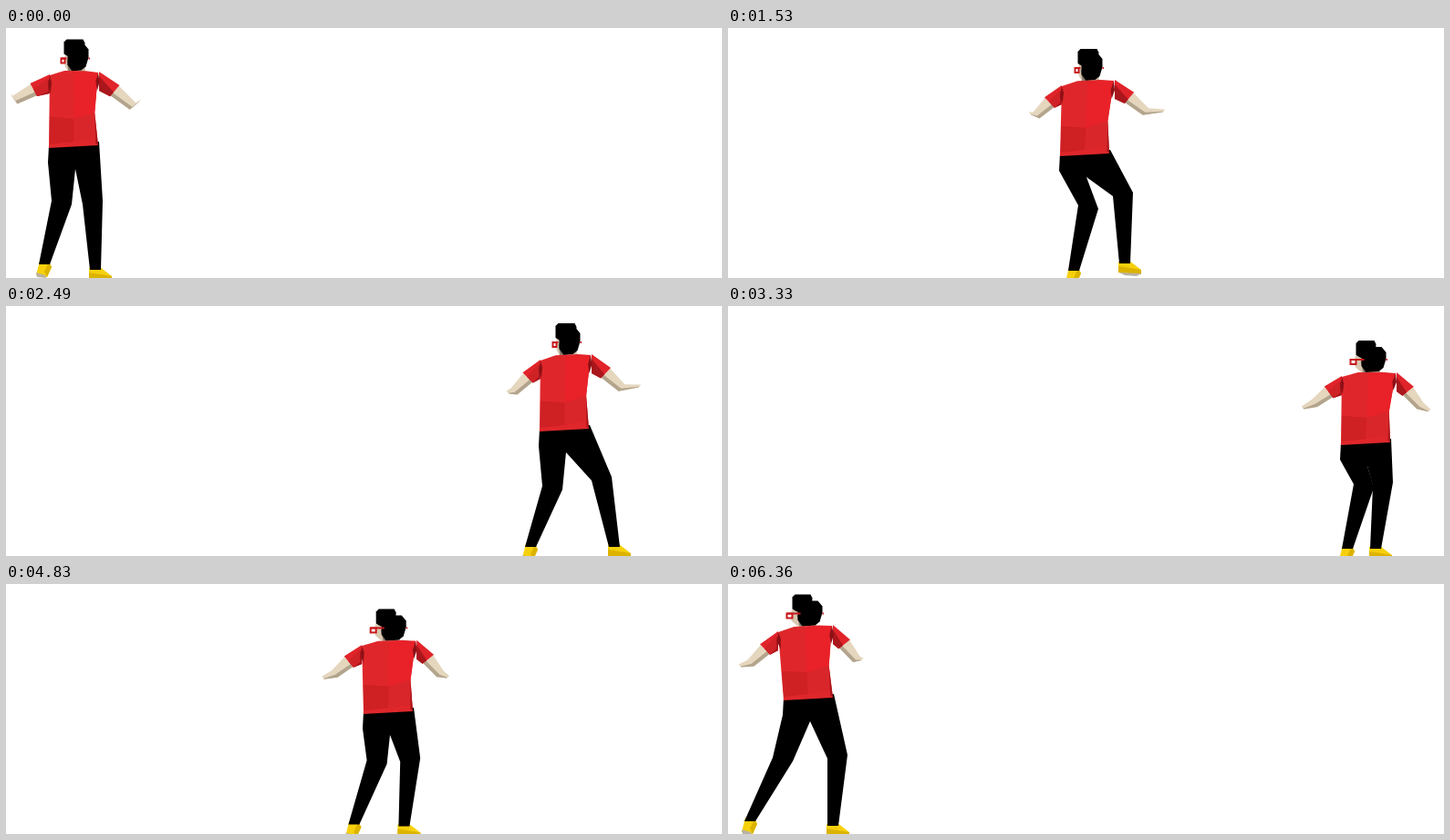
Recreate the animation shown at these times as an HTML page with a canvas. Size 785x275 px, loop 6390 ms.

```html
<!DOCTYPE html>
<html>
<head>
<meta charset="utf-8">
<style>
html, body { margin: 0; width: 100%; height: 100%; overflow: hidden; background: #fff; }
canvas { display: block; }
</style>
</head>
<body>
<canvas id="stage" width="785" height="275"></canvas>
<script>
const ctx = document.getElementById('stage').getContext('2d');
const LOOP = 6390, STEP = 30, TURN = 3143, BACK = 3330;

// Hip height, then x,y pairs with x measured from the hips:
// shoulders, left wrist and tip, right wrist and tip, knees, ankles.
const rest = [152, -29,80, 37,76, -56,107, -69,112, 60,110, 70,115, -2,198, 19,196, -20,265, 11,265];
const rightSteps = [
  [0.1, rest],
  [0.348, [140, -28,66, 36,60, -53,96, -60,94, 67,92, 87,91, 4,197, 42,183, -12,265, 44,257]],
  [0.581, [137, -29,62, 33,56, -55,94, -62,95, 63,90, 83,88, -13,200, 41,190, -37,263, 55,263]],
  [0.79, [131, -29,54, 31,51, -64,79, -68,74, 65,86, 73,80, -13,192, 21,192, -32,258, 24,264]]
];
const leftSteps = [
  [0.18, rest],
  [0.4925, [127, -36,55, 30,48, -63,87, -75,90, 53,83, 59,83, -28,193, 32,190, -64,259, 27,264]],
  [0.68, [133, -31,60, 34,56, -58,93, -75,94, 60,91, 65,94, -9,196, 40,188, -30,264, 54,257]],
  [0.93, [140, -27,65, 41,60, -49,96, -62,103, 61,95, 70,97, 0,195, 28,188, -9,264, 5,258]]
];
// Time and x of the hips.
const path = [
  [0, 74], [675, 195], [1335, 352], [1530, 391], [1995, 497], [2490, 612], [2655, 653],
  [3000, 702], [3330, 699], [3975, 592], [4170, 543], [4635, 458], [5295, 326],
  [5490, 263], [5955, 174], [6360, 88]
];

const lerp = (a, b, k) => a + (b - a) * k;
const mix = (p, q, k) => p.map((v, i) => lerp(v, q[i], k));
const clamp = v => Math.min(1, Math.max(0, v));
const add = (p, x, y) => [p[0] + x, p[1] + y];

function along(keys, t) {
  let i = 1;
  while (i < keys.length - 1 && keys[i][0] < t) i++;
  const [a, va] = keys[i - 1], [b, vb] = keys[i];
  return lerp(va, vb, clamp((t - a) / (b - a)));
}

function cyclePose(keys, phase) {
  let p = phase % 1;
  if (p < keys[0][0] - 1e-6) p++;
  const ring = [...keys, [keys[0][0] + 1, keys[0][1]]];
  let i = 1;
  while (i < ring.length - 1 && ring[i][0] < p) i++;
  const [a, from] = ring[i - 1], [b, to] = ring[i];
  return mix(from, to, clamp((p - a) / (b - a)));
}

function poly(color, ...points) {
  ctx.fillStyle = color;
  ctx.beginPath();
  points.forEach(p => ctx.lineTo(...p));
  ctx.fill();
}

function leg(side, hip, knee, ankle) {
  const outer = side < 0 ? [[-27, hip - 2], [-28, hip + 17]] : [[28, hip - 6]];
  poly('#000', [2, hip - 4], ...outer, add(knee, side * 11, -2), add(ankle, side * 6, 2),
    add(ankle, -side * 6, 2), add(knee, -side * 11, 2), [2, hip + 24]);
}

function shoes(left, right) {
  const at = (p, pts) => pts.map(([x, y]) => add(p, x, y));
  poly('#f6d00c', ...at(left, [[-5, -2], [5, -1], [8, 5], [3, 16], [-9, 14]]));
  poly('#dcb300', ...at(left, [[5, -1], [8, 5], [3, 16], [0, 10]]));
  poly('#b9b2a2', ...at(left, [[-9, 11], [1, 14], [2, 17], [-8, 16]]));
  poly('#f6d00c', ...at(right, [[-7, 0], [5, -1], [18, 9], [18, 14], [-7, 12]]));
  poly('#dcb300', ...at(right, [[-7, 5], [6, 7], [18, 9], [18, 14], [-7, 12]]));
  poly('#b9b2a2', ...at(right, [[-6, 12], [18, 13], [13, 16], [0, 15]]));
}

function arm(side, shoulder, wrist, tip) {
  const start = add(shoulder, 0, 6), end = mix(start, wrist, 0.42);
  const dx = wrist[0] - start[0], dy = wrist[1] - start[1], len = Math.hypot(dx, dy);
  const up = [dy / len * side, -dx / len * side];
  const off = (p, w) => add(p, up[0] * w, up[1] * w);
  poly('#e5d6be', off(end, 7), off(wrist, 5), off(tip, 2), off(tip, -2), off(wrist, -5), off(end, -7));
  poly('#b3a48d', off(end, -3), off(wrist, -1), off(tip, -1), off(tip, -2), off(wrist, -5), off(end, -7));
  poly('#e0242a', add(shoulder, -side * 3, -3), off(end, 8), off(end, -8), add(shoulder, -side * 3, 18));
  poly('#a9161b', add(shoulder, -side * 3, 2), off(end, -2), off(end, -8), add(shoulder, -side * 3, 18));
  if (side < 0) poly('#cf2226', add(shoulder, 1, 2), off(end, 1), off(end, -8), add(shoulder, 1, 16));
}

function torso(left, right, hip) {
  const top = [add(left, 3, -2), add(right, -4, -2)], base = [[-27, hip + 1], [27, hip - 2]];
  const q = (u, v) => mix(mix(...top, u), mix(...base, u), v);
  poly('#df272b', q(0, 0), q(0.3, -0.05), q(0.75, -0.03), q(1, 0), q(0.93, 0.55), q(1, 1), q(0, 1));
  poly('#e92128', q(0.5, -0.02), q(1, 0), q(0.93, 0.55), q(0.5, 0.62));
  poly('#cf2024', q(0.01, 0.57), q(0.5, 0.62), q(0.5, 0.93), q(0.01, 0.95));
  poly('#d9262a', q(0.5, 0.62), q(0.93, 0.55), q(0.96, 0.9), q(0.5, 0.93));
  poly('#a9161b', q(0.93, 0.55), q(1, 1), q(0.95, 0.97));
  poly('#8d1015', q(0, 0), q(0.04, 0.1), q(0.02, 0.25), q(-0.03, 0.14));
  poly('#8d1015', q(1, 0), q(1.03, 0.13), q(0.98, 0.25), q(0.95, 0.12));
}

function head(x, y, d) {
  const at = (...pts) => pts.map(([px, py]) => [x + px, y + py]);
  poly('#c9b9a4', ...at([-8, 30], [10, 30], [11, 42], [-9, 42]));
  poly('#d8c8b2', ...at([-12 - 5 * d, 17], [-5, 17], [-4, 35], [-9 - d, 35], [-12 - 5 * d, 29]));
  poly('#85796b', ...at([-10 - d, 23], [-5, 20], [-4, 35], [-8, 35]));
  const l = -13 - 3 * d, r = 9 - 4 * d;
  poly('#000', ...at([l, 3], [l + 3, 0], [r - 1, 0], [r + 1, 4], [r, 17], [l + 5, 19], [l, 16]));
  const b = -9 - d, e = 14 + 3 * d, t = 5 + 2 * d;
  poly('#000', ...at([b, t + 3], [b + 5, t], [e - 5, t], [e, t + 6], [e, 20], [e - 3, 30], [e - 8, 34], [b + 5, 35], [b, 28]));
  ctx.strokeStyle = ctx.fillStyle = '#c9181d';
  ctx.lineWidth = 2;
  ctx.strokeRect(x - 16 - 6 * d, y + 21, 4 + 2 * d, 5);
  ctx.fillRect(x - 16 - 6 * d, y + 20, 6 + 9 * d, 2);
  ctx.fillRect(x + e, y + 20, 1.5, 2);
}

function draw(t) {
  const pose = t < TURN ? cyclePose(rightSteps, 0.79 + t / 430)
    : cyclePose(leftSteps, 0.18 + Math.max(0, t - BACK) / 480);
  const hip = pose[0];
  const [sL, sR, wL, tL, wR, tR, kL, kR, aL, aR] =
    Array.from({ length: 10 }, (_, i) => pose.slice(1 + 2 * i, 3 + 2 * i));
  ctx.setTransform(1, 0, 0, 1, 0, 0);
  ctx.fillStyle = '#fff';
  ctx.fillRect(0, 0, 785, 275);
  ctx.translate(along(path, t), 0);
  shoes(aL, aR);
  leg(-1, hip, kL, aL);
  leg(1, hip, kR, aR);
  const neck = mix(sL, sR, 0.5);
  head(neck[0] + 1.5, neck[1] - 40, clamp((t - 3000) / (BACK - 3000)));
  arm(-1, sL, wL, tL);
  arm(1, sR, wR, tR);
  torso(sL, sR, hip);
}

const start = performance.now();
function tick() {
  const t = (performance.now() - start) % LOOP;
  draw(Math.floor(t / STEP) * STEP);
  requestAnimationFrame(tick);
}
tick();
</script>
</body>
</html>
```
